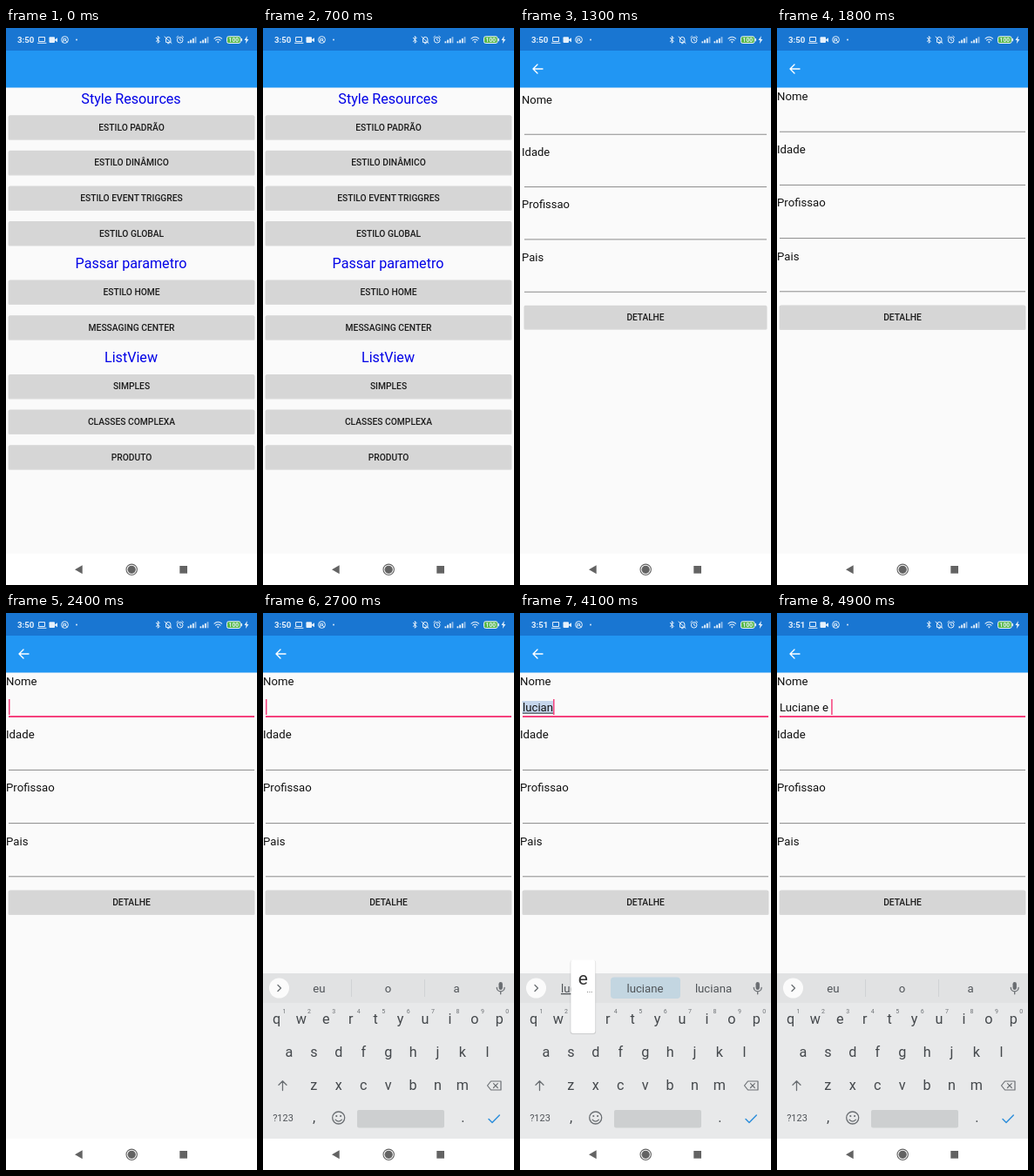
Write an HTML page that moves like this. It is 288 px wide and 640 px high and loops after 5 s.

```html
<!DOCTYPE html>
<html lang="pt">
<head>
<meta charset="utf-8">
<title>Formulário</title>
<style>
  html, body { margin: 0; width: 100%; height: 100%; overflow: hidden; background: #fafafa; }
  svg { display: block; width: 288px; height: 640px; }
  text { font-family: Roboto, sans-serif; white-space: pre; }
  .mid { text-anchor: middle; }
  .title { font-size: 16.13px; fill: #0000e6; }
  .label { font-size: 13.2px; fill: #111; }
  .button { font-size: 10.27px; font-weight: 500; fill: #1c1c1c; }
  .key { font-size: 16.2px; fill: #44484c; }
  .hint { font-size: 7px; fill: #6f7377; }
  .word { font-size: 13.2px; fill: #505458; }
  .line { fill: none; stroke-linecap: round; stroke-linejoin: round; }
</style>
</head>
<body>
<svg id="stage" viewBox="0 0 288 640"></svg>
<script>
const LOOP = 5000;
const ACCENT = '#f5407c';
const FORM_ORIGIN = { x: 144, y: 336 };

const rect = (x, y, w, h, fill, more = '') =>
  `<rect x="${x}" y="${y}" width="${w}" height="${h}" fill="${fill}" ${more}/>`;
const circle = (x, y, r, more) => `<circle cx="${x}" cy="${y}" r="${r}" ${more}/>`;
const path = (d, stroke, width = 1.2) =>
  `<path class="line" d="${d}" stroke="${stroke}" stroke-width="${width}"/>`;
const shape = (d, fill) => `<path d="${d}" fill="${fill}"/>`;
const text = (s, x, y, cls, more = '') => `<text x="${x}" y="${y}" class="${cls}" ${more}>${s}</text>`;
const group = (id, body, more = '') => `<g id="${id}" ${more}>${body}</g>`;

const button = (s, y) =>
  rect(2.5, y - 13.2, 283, 28, '#000', 'rx="1.5" opacity=".13"') +
  rect(3, y - 13.8, 282, 27.4, '#d6d6d6', 'rx="1.5"') +
  text(s, 144, y + 3.7, 'mid button');

function statusBar() {
  const w = '#e6f1fb';
  const signal = x => [0, 1, 2, 3].map(i =>
    rect(x + i * 2.7, 15.3 - i * 1.7, 1.8, 2 + i * 1.7, w, i > 2 ? 'opacity=".6"' : '')).join('');
  return rect(0, 0, 288, 26, '#1976d2') +
    `<text id="clock" x="13" y="17" font-size="9.7" font-weight="700" fill="${w}"></text>` +
    path('M38 10.5h6.5v5H38zM36.5 17.3h9.5', w, 1) +
    rect(49.5, 10.3, 6.5, 6.6, w, 'rx="1"') + shape('M56 13.2l3-2v5l-3-2z', w) +
    circle(67.5, 13.5, 3.9, `fill="none" stroke="${w}"`) +
    path('M65.7 15.5v-3.2h3v2h-2M68 14l2 2', w, .9) + circle(81, 13.5, .9, `fill="${w}"`) +
    path('M172.3 11.3l4 4-2 2V9.5l2 2-4 4', w, 1) +
    path('M183.5 16v-3a2.7 2.7 0 0 1 5.4 0v3zM182 10l8 7.5M185.5 17.7h1.6', w, 1) +
    circle(199.7, 13.8, 3.3, `fill="none" stroke="${w}"`) +
    path('M199.7 12v2l1.3.6M195.8 10.7l1.7-1.4M203.6 10.7l-1.7-1.4', w, .9) +
    signal(208.5) + signal(222.5) +
    path('M239 12.2q4.3-3.8 8.6 0M240.6 14.2q2.7-2.4 5.4 0', w, 1.1) +
    shape('M241.8 15.5h3l-1.5 2z', w) +
    rect(253.5, 9.7, 15.6, 7.8, '#58b947', `rx="2" stroke="${w}"`) + rect(269.8, 12, 1.2, 3.2, w) +
    text('100', 261.3, 16.1, 'mid', `font-size="6.6" font-weight="700" fill="${w}"`) +
    shape('M276.8 9l-3.3 5h2l-.6 4 3.5-5h-2.1z', w);
}

function listPage() {
  const titles = { 'Style Resources': 86.5, 'Passar parametro': 276, 'ListView': 384 };
  const buttons = {
    'ESTILO PADRÃO': 114, 'ESTILO DINÂMICO': 154.6, 'ESTILO EVENT TRIGGRES': 195.2, 'ESTILO GLOBAL': 235.8,
    'ESTILO HOME': 303.2, 'MESSAGING CENTER': 344, 'SIMPLES': 411.7, 'CLASSES COMPLEXA': 452.3, 'PRODUTO': 493
  };
  return Object.entries(titles).map(([s, y]) => text(s, 143.5, y, 'mid title')).join('') +
    Object.entries(buttons).map(([s, y]) => button(s, y)).join('');
}

function formPage() {
  return ['Nome', 'Idade', 'Profissao', 'Pais'].map((s, i) =>
    text(s, 0, 83 + i * 61.2, 'label') +
    rect(3, 118.7 + i * 61.2, 282, 1, '#8a8a8a')).join('') +
    button('DETALHE', 332.2) +
    group('focus',
      rect(3, 118, 282, 2, ACCENT) +
      rect(2.5, 101, 0, 15, '#c6d6ec', 'id="flash"') +
      text('', 3, 113, 'label', 'id="entry"') +
      rect(3, 114.6, 0, 1, '#333', 'id="composing"') +
      rect(3, 99, 1.5, 18, ACCENT, 'id="cursor"'));
}

const keys = {};
function keyRow(letters, x, y) {
  return [...letters].map((c, i) => {
    keys[c] = { x: x + i * 28.42, y };
    return text(c, keys[c].x, y + 4.9, 'mid key');
  }).join('');
}

function keyboard() {
  const g = '#6a6e72';
  const hints = [...'1234567890'].map((c, i) => text(c, 24.5 + i * 28.42, 460.3, 'mid hint')).join('');
  return rect(0, 414, 288, 192, '#e8e9ea') + rect(0, 414, 288, 34, '#e1e2e3') +
    circle(18.5, 431, 11.5, 'fill="#fbfbfb"') + path('M17 427.5l3.5 3.5-3.5 3.5', g, 1.3) +
    group('dividers', rect(101, 421, 1, 20, '#d0d2d4') + rect(185, 421, 1, 20, '#d0d2d4')) +
    rect(104, 418.5, 80, 24.5, '#c3d6e1', 'rx="4" id="pick"') +
    [64.5, 143.5, 222].map((x, i) => text('', x, 436, 'mid word', `id="word${i}"`)).join('') +
    rect(270.5, 424, 4.4, 9, g, 'rx="2.2"') +
    path('M268.3 430.5a4.4 4.4 0 0 0 8.8 0M272.7 435v2.8', g, 1.3) +
    keyRow('qwertyuiop', 15.5, 467) + hints +
    keyRow('asdfghjkl', 30, 505) + keyRow('zxcvbnm', 58.3, 543) +
    path('M22.5 548.5V538M18 542.3l4.5-4.6 4.5 4.6', g, 1.3) +
    path('M261.5 538h11.5v10h-11.5l-4-5zM264.5 540.7l4.8 4.8M269.3 540.7l-4.8 4.8', g, 1.2) +
    text('?123', 23, 584, 'mid', 'font-size="11" fill="#505458"') +
    text(',', 58.5, 585, 'mid key') + text('.', 229.5, 585, 'mid key') +
    circle(86.7, 580, 7, `fill="none" stroke="${g}" stroke-width="1.3"`) +
    circle(84.3, 578, 1.1, `fill="${g}"`) + circle(89.1, 578, 1.1, `fill="${g}"`) +
    path('M83 582.2q3.7 4 7.4 0', g, 1.2) +
    rect(108, 571, 100, 20.5, '#cdcfd0', 'rx="2"') +
    path('M259 581.5l4 4 8.3-8.5', '#2e8fdb', 1.5) +
    group('popup',
      rect(-14.8, -68, 29.6, 85, '#000', 'rx="3" opacity=".12"') +
      rect(-14, -68.5, 28, 84.5, '#fff', 'rx="3"') +
      text('', 0, -40, 'mid', 'id="popupKey" font-size="21" fill="#333"') +
      text('...', 7.5, -31, 'mid', 'font-size="9" fill="#555"'));
}

function navBar() {
  const c = '#636363';
  return rect(0, 604, 288, 36, '#fff') + shape('M79 622.3l8.7-5v10z', c) +
    circle(144.2, 622.3, 6.2, `fill="none" stroke="${c}" stroke-width="1.1"`) +
    circle(144.2, 622.3, 4.6, `fill="${c}"`) + rect(199.3, 618, 8.7, 8.7, c);
}

const stage = document.getElementById('stage');
stage.innerHTML = rect(0, 0, 288, 640, '#fafafa') +
  group('list', listPage()) + group('form', formPage()) +
  rect(0, 26, 288, 42.5, '#2196f3') + statusBar() +
  group('back', path('M26 47H15M20 42l-5 5 5 5', '#fff', 1.4)) +
  group('keyboard', keyboard()) + navBar();

const el = id => document.getElementById(id);
const show = (id, on) => { el(id).style.display = on ? '' : 'none'; };

// Each track holds [start, value] steps; a value lasts until the next one.
const at = (steps, t) => steps.reduce((v, [start, value]) => (t >= start ? value : v), steps[0][1]);

const formScale = [[0, 0], [1300, .986], [1400, 1]];
const keyboardDrop = [[0, 190], [2500, 95], [2600, 0]];
const clock = [[0, '3:50'], [3800, '3:51']];
const typed = [
  [0, ''], [3200, 'l'], [3400, 'lu'], [3600, 'luc'], [3700, 'luci'], [3900, 'lucia'],
  [4000, 'lucian'], [4200, 'luciane'], [4400, 'Luciane '], [4600, 'Luciane e'], [4800, 'Luciane e ']
];
const START_WORDS = ['eu', 'o', 'a'];
const words = [
  [0, START_WORDS], [3300, ['l', 'o', 'lá']], [3500, ['lu', 'lua', 'luz']],
  [3800, ['luci', 'luciane', 'luciana']], [4100, ['lucian', 'luciane', 'luciana']],
  [4300, ['luciane', 'Luciane', 'luciana']], [4500, ['e', 'de', 'da']], [4800, START_WORDS]
];
const pressed = [
  [0, ''], [3100, 'l'], [3200, ''], [3300, 'u'], [3400, ''], [3500, 'c'], [3600, 'i'], [3700, ''],
  [3800, 'a'], [3900, 'n'], [4000, ''], [4100, 'e'], [4200, ''], [4500, 'e'], [4600, '']
];

function draw(t) {
  const scale = at(formScale, t);
  const { x, y } = FORM_ORIGIN;
  show('list', !scale);
  show('form', scale);
  show('back', scale);
  el('form').setAttribute('transform', `translate(${x} ${y}) scale(${scale || 1}) translate(${-x} ${-y})`);
  show('focus', t >= 2300);
  el('clock').textContent = at(clock, t);

  const entry = at(typed, t);
  el('entry').textContent = entry;
  const width = entry ? el('entry').getComputedTextLength() : 0;
  const composing = entry && !entry.includes(' ');
  el('cursor').setAttribute('x', 3 + width);
  el('composing').setAttribute('width', composing ? width : 0);

  const correcting = t >= 4100 && t < 4400;
  el('flash').setAttribute('width', correcting ? width + 1 : 0);
  show('pick', correcting);
  show('dividers', !correcting);

  show('keyboard', t >= 2500);
  el('keyboard').setAttribute('transform', `translate(0 ${at(keyboardDrop, t)})`);
  at(words, t).forEach((s, i) => { el('word' + i).textContent = s; });
  el('word0').style.textDecoration = composing ? 'underline' : 'none';

  const key = at(pressed, t);
  show('popup', key);
  if (key) {
    el('popup').setAttribute('transform', `translate(${keys[key].x} ${keys[key].y})`);
    el('popupKey').textContent = key;
  }
}

const begin = performance.now();
function tick() {
  draw((performance.now() - begin) % LOOP);
  requestAnimationFrame(tick);
}
tick();
</script>
</body>
</html>
```
